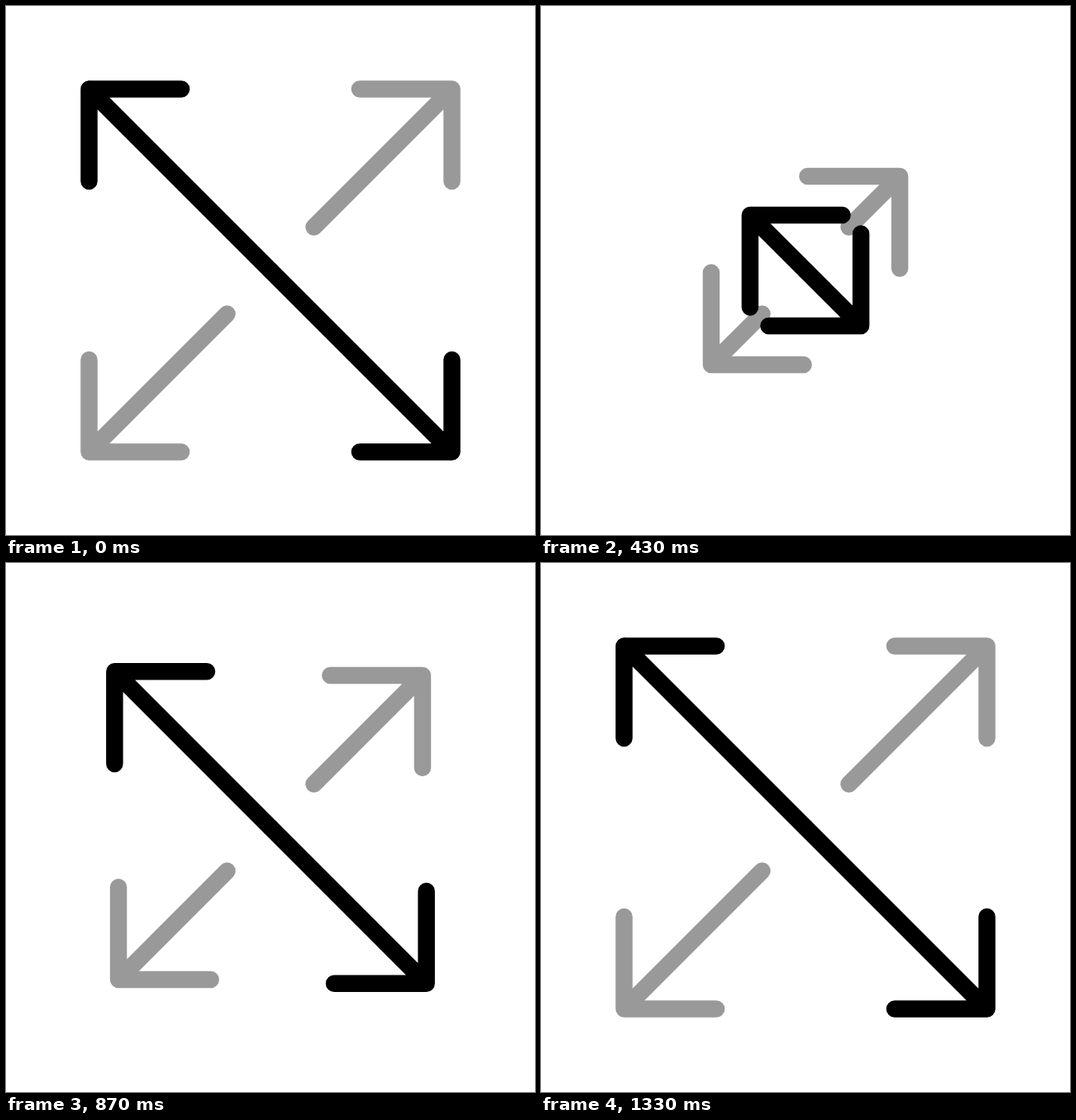
Recreate the animation shown at these times as an HTML page with a canvas. Size 640 by 640 pixels, loop 2 s.

```html
<!DOCTYPE html>
<html>
<head>
<meta charset="utf-8">
<style>
  html, body { margin: 0; width: 100%; height: 100%; overflow: hidden; background: #fff; }
  canvas { display: block; }
</style>
</head>
<body>
<canvas id="stage" width="640" height="640"></canvas>
<script>
const ctx = document.getElementById('stage').getContext('2d');
const LOOP = 2000;
const FRAME = 1000 / 30;
const SIZE = 640;
const REST = 100.5;
const HEAD = 111.6;
const INNER = 267.5;

// [frame, inward offset in px]
const BLACK_KEYS = [[0, 0], [15, 160.2], [20.5, 0], [30, 50], [40, 0]];
const GRAY_KEYS = [[0, 0], [14, 107], [19, 4.6], [31.8, 58.9], [40, 0]];

const ease = u => u * u * (3 - 2 * u);

function valueAt(keys, frame) {
  for (let i = 1; i < keys.length; i++) {
    const [start, from] = keys[i - 1];
    const [end, to] = keys[i];
    if (frame < end) return from + (to - from) * ease((frame - start) / (end - start));
  }
  return keys[keys.length - 1][1];
}

// Arrow head at (x, y) pointing away from the centre, with a shaft to (tx, ty).
function arrow(x, y, tx, ty) {
  const dx = x < SIZE / 2 ? HEAD : -HEAD;
  const dy = y < SIZE / 2 ? HEAD : -HEAD;
  ctx.beginPath();
  ctx.moveTo(x + dx, y);
  ctx.lineTo(x, y);
  ctx.lineTo(x, y + dy);
  ctx.moveTo(x, y);
  ctx.lineTo(tx, ty);
  ctx.stroke();
}

function draw(time) {
  const tick = Math.floor((time % LOOP) / 10) * 10;
  const frame = Math.floor((tick + 4) / FRAME);
  const g = REST + valueAt(GRAY_KEYS, frame);
  const b = REST + valueAt(BLACK_KEYS, frame);

  ctx.fillStyle = '#fff';
  ctx.fillRect(0, 0, SIZE, SIZE);
  ctx.lineWidth = 20.5;
  ctx.lineCap = ctx.lineJoin = 'round';

  ctx.strokeStyle = '#999';
  arrow(g, SIZE - g, INNER, SIZE - INNER);
  arrow(SIZE - g, g, SIZE - INNER, INNER);

  ctx.strokeStyle = '#000';
  arrow(b, b, SIZE / 2, SIZE / 2);
  arrow(SIZE - b, SIZE - b, SIZE / 2, SIZE / 2);
}

const origin = performance.now();
function loop() {
  draw(performance.now() - origin);
  requestAnimationFrame(loop);
}
loop();
</script>
</body>
</html>
```
